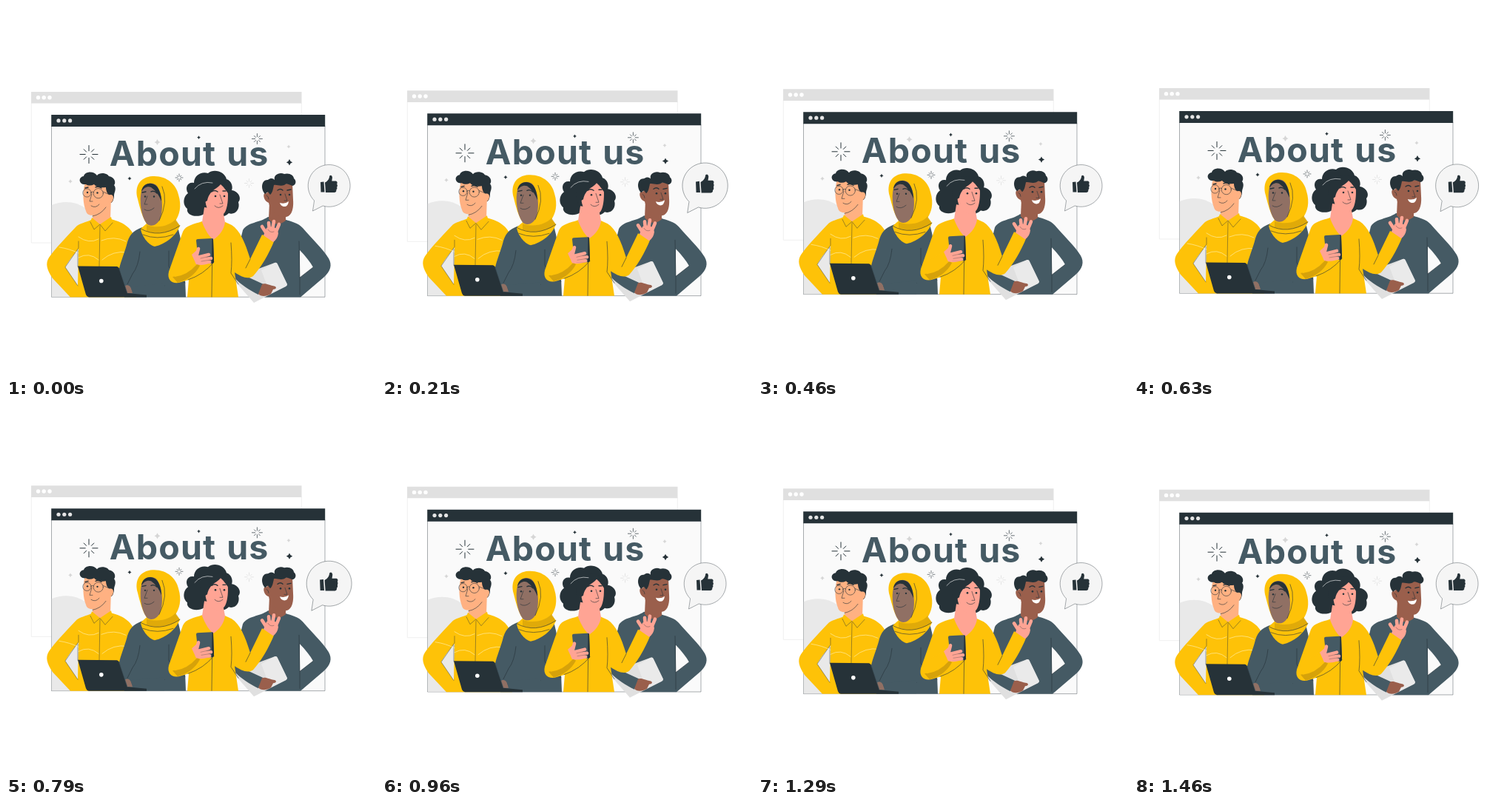
An HTML page that plays this animation: 500 px wide and 500 px high, repeating every 1500 ms.

```html
<!DOCTYPE html>
<html lang="en">
<head>
<meta charset="utf-8">
<title>About us</title>
<style>
  html, body { margin: 0; width: 100%; height: 100%; overflow: hidden; background: #fff; }
  svg { display: block; width: 100%; height: 100%; }
  text { font: 700 46.5px Inter, Roboto, sans-serif; letter-spacing: 1.2px; word-spacing: 1.6px; fill: #455a64; }
  .dark { fill: #263238; }
  .blue { fill: #455a64; }
  .yellow { fill: #fec208; }
  .shade { fill: #d6a20a; }
  .light { fill: #e0e0e0; }
  .peach { fill: #ffb182; }
  .skin { fill: #ffa494; }
  .brown { fill: #907064; }
  .deep { fill: #9a5f4c; }
  .ink, .pale, .rays { fill: none; stroke: #263238; stroke-width: .6; stroke-linecap: round; stroke-linejoin: round; }
  .bold { stroke-width: 1.4; }
  .pale { stroke: #fff3bd; }
  .fingers { fill: none; stroke: #ffa494; stroke-width: 4.6; stroke-linecap: round; stroke-linejoin: round; }
</style>
</head>
<body>
<svg viewBox="0 0 500 500">
  <g id="scene">
    <g id="backWindow">
      <path d="M34.3 131V320H399.3V131" fill="#fff" stroke="#e6e6e6" stroke-width=".6"/>
      <path class="light" d="M34 116H399.5V131.6H34Z"/>
      <g fill="#fff"><circle cx="43.5" cy="123.7" r="2.7"/><circle cx="51.2" cy="123.7" r="2.7"/><circle cx="59" cy="123.7" r="2.7"/></g>
    </g>
    <g id="frontWindow">
      <path d="M61.5 162V393.3H431V162" fill="#fafafa" stroke="#263238" stroke-width=".4"/>
      <path fill="#e9e9e9" d="M61.8 269C88 258 117 270 128 302V393H61.8Z"/>
      <path class="dark" d="M61.2 147H431.2V163H61.2Z"/>
      <g fill="#e6e6e6"><circle cx="71" cy="154.9" r="2.6"/><circle cx="78.8" cy="154.9" r="2.6"/><circle cx="86.6" cy="154.9" r="2.6"/></g>
    </g>
    <text x="139.8" y="215.9">About us</text>
    <g id="stars"></g>

    <g id="glassesMan">
      <path class="yellow" fill-rule="evenodd" d="M117 288C108 293 99 293 94 299C80 314 66 328 58 340C53 348 55 356 63 368L87 393.5H176V320C172 300 160 293 142 288ZM98 328C90 338 84 345 80 353L97 378Z"/>
      <path class="peach" d="M117 272V291Q127 301 141 289L142 258Z"/>
      <path class="peach" d="M107 238C103 252 104 267 108 277C110 285 120 284 128 279C134 276 138 272 139 267C147 266 147 255 140 254L136 238Z"/>
      <path class="dark" d="M108 241C98 242 97 231 105 230C106 224 118 222 123 229C127 224 137 226 139 230C147 231 149 239 146 242C150 247 146 252 146 256C146 261 144 265 142 266L141 255C137 256 135 249 135 245C128 246 122 245 119 241C115 243 111 243 108 241Z"/>
      <path class="peach" d="M139 257C143 252 147 258 144 263Q142 267 138 266Z"/>
      <g class="ink"><circle cx="109.5" cy="252.5" r="5.6"/><circle cx="124.8" cy="253.2" r="6.6"/>
        <path d="M115 251.5Q117 250.5 118.3 251.5M131 251L140 255M116 254L113 264H117M115 270Q121 274 126 268M117 284Q128 282 135 272"/>
        <path class="bold" d="M107 246L111 245M121 245Q125 243 129 246"/></g>
      <circle class="dark" cx="110" cy="252" r="1.2"/><circle class="dark" cx="123.5" cy="252.5" r="1.2"/>
      <path class="yellow" d="M116 286L127 295L142 285L144 293L134 304L127 296L119 302L114 292Z"/>
      <path class="ink" d="M114 292L119 302L127 295L134 304L144 293M127 297L126 352M98 318V327L80 353L97 378M97 330V352" opacity=".75"/>
      <path class="pale" d="M72 326Q86 328 98 334M98 312Q112 322 125 315M129 317Q146 310 162 318M98 340Q112 332 125 343M130 343Q145 330 164 333"/>
    </g>

    <g id="scarfWoman">
      <path class="blue" d="M184 299C171 304 166 310 163 323C159 337 153 350 152 361L160 393.5H243C242 367 241 331 232 298Z"/>
      <path class="yellow" d="M178 261C173 244 181 231 198 230C217 229 230 241 233 255C238 271 234 283 229 290L235 297C231 309 216 322 201 325C192 323 183 310 182 301L190 294C184 285 181 273 178 261Z"/>
      <path class="brown" d="M183 250C185 239 197 237 203 242C212 252 213 277 208 288C204 297 195 299 190 294C182 283 180 262 183 250Z"/>
      <path class="dark" d="M183 251C184 240 196 236 204 244C208 249 210 257 210 264C207 256 202 249 196 245C191 243 186 246 183 251Z"/>
      <path class="shade" d="M190 296C207 302 224 295 229 288L235 297C222 307 203 309 190 304Z" opacity=".75"/>
      <g class="ink"><path d="M191 257L187 268H191M187 275Q193 279 200 273M182 301Q207 315 235 297M185 309Q204 317 226 309M211 244Q220 264 207 290"/>
        <path class="bold" d="M184 252L189 251M196 251Q200 249 204 253"/></g>
      <circle class="dark" cx="188" cy="257.5" r="1.2"/><circle class="dark" cx="200" cy="257.5" r="1.2"/>
      <path class="ink" d="M181 332Q179 352 171 362L164 376M220 331V352Q225 366 242 374M169 383Q193 376 214 378"/>
      <path class="brown" d="M160 379C163 376 167 377 169 381L171 388H163Z"/>
      <path class="blue" d="M168 379L214 375V393H174Z"/>
    </g>
    <g id="laptop">
      <path class="dark" d="M97 351.5L150 352Q152 352.5 153 354.5L164 388L190 390.5V393.5H112Q109 393 108 390Z"/>
      <path class="ink" d="M153 355L164 388" style="stroke:#455a64"/>
      <circle cx="128.8" cy="371.5" r="2.8" fill="#fff"/>
    </g>

    <g id="tabletMan">
      <path class="blue" fill-rule="evenodd" d="M354 285C343 293 326 292 320 303L309 348L345 393.5H398L429 367C439 358 441 350 436 341C428 328 413 314 401 300C395 293 387 292 376 288ZM397 330C405 338 411 346 415 353L397 367Z"/>
      <path class="deep" d="M356 265L355 288Q365 300 378 290V275Z"/>
      <path class="deep" d="M354 241L353 253C346 250 347 263 355 266C357 276 365 285 376 285C386 286 389 274 388 262L387 240Z"/>
      <path class="dark" d="M350 254C343 246 346 234 354 235C358 232 361 233 363 235C361 228 370 224 376 227C383 225 389 229 389 233C393 236 392 242 387 243C381 241 380 239 376 242C370 244 366 241 362 242C361 247 360 253 357 255L354 251Z"/>
      <path fill="#fff" d="M370 266Q377 268 382 264Q381 272 375 271Q371 270 370 266Z"/>
      <g class="ink"><path d="M377 254L380 263H376M352 256Q355 257 355 261M396 318L397 367L415 353M397 367V390"/>
        <path class="bold" d="M367 249Q371 246 374 249M380 249L385 248"/></g>
      <circle class="dark" cx="371" cy="255" r="1.3"/><circle class="dark" cx="383" cy="255" r="1.3"/>
      <path class="light" d="M306 368L363 347Q366 346 367 349L380 376Q380 378 378 379L335 401Z"/>
      <path fill="#f2f2f2" d="M345 357L363 347Q366 346 367 349L380 376Q380 378 378 379L357 389Z" opacity=".6"/>
      <path class="blue" d="M308 352L322 364L348 376L341 390C329 384 318 377 308 367Z"/>
      <path class="deep" d="M346 376C350 374 354 377 364 379Q367 382 361 383L358 389C352 393 344 393 341 389Z"/>
    </g>

    <g id="phoneWoman">
      <path class="dark" d="M268 281C258 287 243 283 245 274C237 267 241 256 246 253C241 245 246 237 254 239C254 229 264 223 273 226C281 219 296 224 298 234C305 236 307 245 305 249C314 250 319 260 314 265C317 275 309 283 301 280C293 288 274 288 268 281Z"/>
      <path class="yellow" d="M265 291C254 295 243 296 239 305C233 322 226 342 220 359C217 371 226 377 237 373L247 370L245 393.5H314L309 360C318 366 327 370 334 365C344 354 355 336 363 316L346 309L330 342C323 319 316 303 305 296L294 291Z"/>
      <path class="skin" d="M268 272L265 292C269 303 275 312 280 316C289 310 295 301 296 292L293 276Z"/>
      <path class="skin" d="M271 241C268 252 268 267 273 276C278 285 288 287 294 281C300 275 301 257 299 243Q286 231 271 241Z"/>
      <path class="dark" d="M264 268C260 250 266 234 280 234C292 232 302 239 302 255C298 251 295 245 290 241C284 248 275 249 272 263Z"/>
      <path class="ink" d="M255 247Q264 236 279 239" style="stroke:#fff"/>
      <g class="ink"><path d="M289 255L293 267H289M282 270Q287 275 293 270M279 316L278 393M304 320Q306 345 304 361L314 376M330 342L324 354M246 370Q267 363 281 346"/>
        <path class="bold" d="M278 251Q282 248 286 251M293 250L297 250"/></g>
      <circle class="dark" cx="283" cy="257" r="1.3"/><circle class="dark" cx="295" cy="257" r="1.3"/>
      <path class="shade" d="M225 366Q247 363 257 347L262 351Q253 368 232 374Z"/>
      <path class="yellow" d="M224 350L252 336L258 349Q245 364 228 366Z"/>
      <path class="skin" d="M251 336L260 328L279 338L278 345Q270 352 257 349Z"/>
      <path class="blue" d="M259 315L278 314Q280 314 280 316L281 345Q281 348 278 348H263Q260 348 260 345L257 317Q257 315 259 315Z"/>
      <path class="dark" d="M278.5 314Q280 314 280 316L281 345Q281 348 278 348Z"/>
      <path class="fingers" d="M257 340L260 328M258 340L274 336M258 343L277 341M258 346L275 346"/>
      <path class="ink" d="M263 341L276 338M264 345L277 343" opacity=".5"/>
      <path class="skin" d="M348 310L352 300Q358 296 366 301L368 307Q367 315 361 319Z"/>
      <path class="fingers" d="M353 309L346 298M356 304L355 293M360 303L362 291M364 307L369 295"/>
      <path class="ink" d="M354 302Q357 307 362 305" opacity=".6"/>
    </g>
  </g>

  <g id="bubble">
    <path d="M414.5 277L416.6 263A28.4 28.4 0 1 1 428.2 270Z" fill="#f5f5f5" stroke="#263238" stroke-width=".4" stroke-linejoin="round"/>
    <path class="dark" d="M425 238L429.5 237.5L430.5 251.5H425.5ZM431 238.5C435.5 236.5 437 232.5 437.2 229.5Q440.2 227.5 441 231.5L440.3 236.5H446Q448.5 237.5 447.2 240.5Q448.5 242.5 447.2 244.5Q448 247.5 446.3 248.5Q446.7 251.5 444 252H432Z"/>
  </g>
</svg>
<script>
const $ = id => document.getElementById(id);
const LOOP = 1500;

// Burst of eight strokes, the diagonal ones shorter
function rays(x, y, r, color, width) {
  let d = '';
  for (let i = 0; i < 8; i++) {
    const a = i * Math.PI / 4, end = i % 2 ? r * .8 : r;
    const at = q => `${x + q * Math.cos(a)} ${y + q * Math.sin(a)}`;
    d += `M${at(r * .4)}L${at(end)}`;
  }
  return `<path class="rays" d="${d}" style="stroke:${color};stroke-width:${width}"/>`;
}

function star(x, y, r, color) {
  const k = r * .22;
  return `<path fill="${color}" d="M${x} ${y - r}Q${x + k} ${y - k} ${x + r} ${y}Q${x + k} ${y + k} ${x} ${y + r}` +
    `Q${x - k} ${y + k} ${x - r} ${y}Q${x - k} ${y - k} ${x} ${y - r}Z"/>`;
}

const dark = '#263238', light = '#d6d6d6';
$('stars').innerHTML =
  rays(112, 200.5, 12, dark, 1) + rays(339.4, 179.5, 7, dark, .7) +
  rays(234, 232, 5, dark, .6) + rays(328.5, 239.5, 6, light, .6) +
  star(260.5, 177.7, 2.4, dark) + star(167, 233, 2.6, dark) + star(383, 211.3, 4.2, dark) +
  star(204.5, 184, 4, light) + star(382, 190, 2.6, light) + star(87, 237, 2.8, light);

// Two beats per loop: [progress, scale]
const beats = [[0, 1], [.1, 1.1], [.3, 1], [.4, 1], [.5, 1.1], [.6, 1], [1, 1]];

function beat(p) {
  const i = beats.findIndex(([at]) => at > p);
  const [p0, s0] = beats[i - 1], [p1, s1] = beats[i];
  return s0 + (s1 - s0) * (p - p0) / (p1 - p0);
}

function draw(now) {
  const p = now % LOOP / LOOP;
  const lift = 6 * (1 - Math.abs(2 * p - 1));
  $('scene').setAttribute('transform', `translate(0 ${-lift})`);
  $('bubble').setAttribute('transform', `translate(437 245.5) scale(${beat(p)}) translate(-437 -245.5)`);
  requestAnimationFrame(() => draw(performance.now()));
}
draw(0);
</script>
</body>
</html>
```
